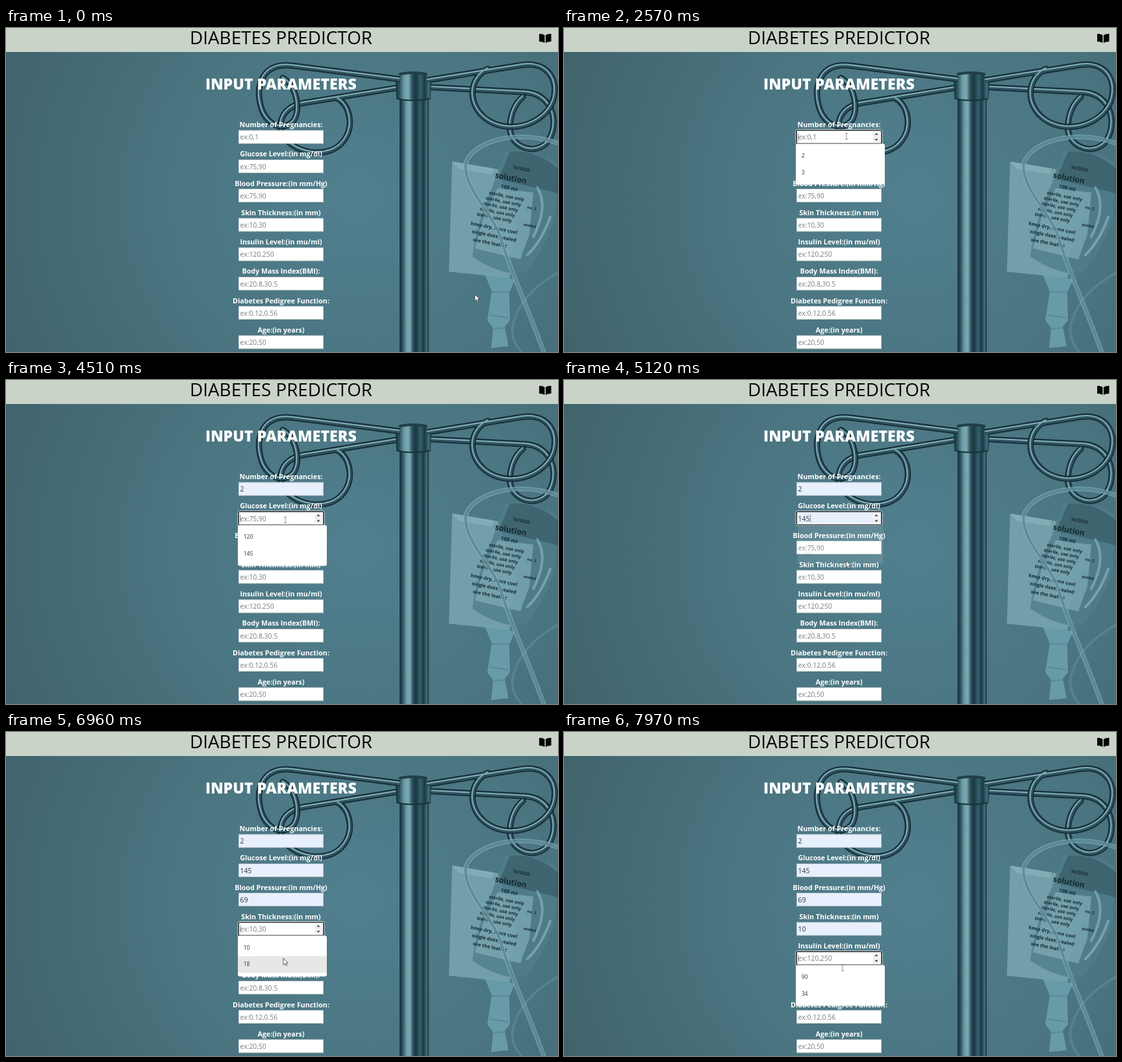
An HTML page with a canvas that plays this animation: 850x500 px, repeating every 8 s.

```html
<!DOCTYPE html>
<html lang="en">
<head>
<meta charset="utf-8">
<title>Diabetes Predictor</title>
<style>
  html, body { margin: 0; width: 850px; height: 500px; overflow: hidden; }
  canvas { display: block; }
</style>
</head>
<body>
<canvas id="stage" width="850" height="500"></canvas>
<script>
const LOOP = 8000, FADE = 130;
const SANS = '"Open Sans", "Noto Sans", sans-serif';
const ctx = document.getElementById('stage').getContext('2d');
const clamp = v => Math.max(0, Math.min(1, v));

// focus: field clicked, pick: suggestion chosen
const fields = [
  { label: 'Number of Pregnancies:', hint: 'ex:0,1', focus: 2460, pick: 3750, options: ['2', '3'], choice: 0 },
  { label: 'Glucose Level:(in mg/dl)', hint: 'ex:75,90', focus: 4250, pick: 5005, options: ['120', '145'], choice: 1 },
  { label: 'Blood Pressure:(in mm/Hg)', hint: 'ex:75,90', focus: 5480, pick: 6110, options: ['76', '69'], choice: 1 },
  { label: 'Skin Thickness:(in mm)', hint: 'ex:10,30', focus: 6510, pick: 7340, options: ['10', '18'], choice: 0 },
  { label: 'Insulin Level:(in mu/ml)', hint: 'ex:120,250', focus: 7780, pick: Infinity, options: ['90', '34'], choice: 0 },
  { label: 'Body Mass Index(BMI):', hint: 'ex:20.8,30.5' },
  { label: 'Diabetes Pedigree Function:', hint: 'ex:0.12,0.56' },
  { label: 'Age:(in years)', hint: 'ex:20,50' }
];
fields.forEach((f, i) => {
  f.y = 157.8 + i * 45.25;
  f.blur = fields[i + 1]?.focus ?? Infinity;
});

// time, x, y
const pointerPath = [
  [0, 722, 411], [19, 722, 411], [20, 707, 399], [520, 707, 399], [760, 547, 329],
  [1010, 547, 329], [1760, 435, 167], [2890, 435, 167], [3240, 431, 199], [3690, 431, 199],
  [3820, 427, 217], [4220, 430, 216], [4600, 430, 216], [5000, 434, 270], [5120, 434.5, 279],
  [5420, 430, 259], [5680, 430, 260], [5790, 429, 283], [6020, 429, 283], [6090, 426, 304],
  [6310, 428, 306], [6640, 428, 306], [6940, 427, 349], [7010, 427, 349], [7240, 428, 332],
  [7380, 428, 332], [7740, 429, 352], [7820, 429, 352], [7950, 429, 364]
];

function pointerAt(t) {
  const next = pointerPath.findIndex(k => k[0] > t);
  if (next < 0) return pointerPath.at(-1).slice(1);
  const [t0, x0, y0] = pointerPath[next - 1], [t1, x1, y1] = pointerPath[next];
  const u = (t - t0) / (t1 - t0), e = u * u * (3 - 2 * u);
  return [x0 + (x1 - x0) * e, y0 + (y1 - y0) * e];
}

function write(c, str, x, y, font, color, align = 'left') {
  c.font = font + ' ' + SANS;
  c.fillStyle = color;
  c.textAlign = align;
  c.fillText(str, x, y);
}

function shape(c, path, fill, stroke, width = 1) {
  const p = new Path2D(path);
  if (fill) { c.fillStyle = fill; c.fill(p); }
  if (stroke) { c.strokeStyle = stroke; c.lineWidth = width; c.stroke(p); }
}

function gradient(c, x0, y0, x1, y1, stops) {
  const g = c.createLinearGradient(x0, y0, x1, y1);
  stops.forEach(([at, color]) => g.addColorStop(at, color));
  return g;
}

function tube(c, path) {
  shape(c, path, null, '#142b34', 9.5);
  shape(c, path, null, '#2f535f', 6);
  c.save();
  c.translate(-.7, -1.2);
  shape(c, path, null, '#83aeb8', 2);
  c.restore();
}

function drawBag(c) {
  const ink = '#152a33';
  shape(c, 'M687 206L758 218L785 300L776 386L682 376Z', 'rgba(127,172,182,.75)');
  shape(c, 'M687 206L752 217L748 226L697 217Z', 'rgba(166,204,211,.3)');
  shape(c, 'M769 190Q805 184 848 208L846 292Q832 336 802 376Q768 386 718 353Q724 303 748 248Z', 'rgba(80,126,139,.8)');
  shape(c, 'M776 191Q815 186 850 217L850 255L758 233Z', 'rgba(35,65,77,.4)');
  shape(c, 'M757 247L812 254L806 318L792 357L722 340L736 290Z', 'rgba(141,187,196,.55)');
  shape(c, 'M818 246Q836 275 812 322M803 350Q824 330 838 292', null, 'rgba(165,205,212,.45)', 4);
  c.save();
  c.translate(776, 216);
  c.rotate(.2);
  write(c, '14/2022', 4, 0, 'bold 7px', ink);
  write(c, 'solution', -20, 19, 'bold 12px', ink);
  write(c, '100 ml', -8, 33, 'bold 8px', ink);
  for (let i = 0; i < 5; i++) {
    write(c, 'sterile, use only', -24 - i * 3, 46 + i * 9, 'bold 7px', ink);
  }
  write(c, 'keep dry, store cool', -42, 98, 'bold 7.5px', ink);
  write(c, 'single dose, sealed', -38, 110, 'bold 7.5px', ink);
  write(c, 'see the leaflet', -34, 122, 'bold 7.5px', ink);
  write(c, 'no. 2', 38, 56, 'bold 6px', ink);
  write(c, 'sealed', 38, 83, 'bold 6px', ink);
  c.restore();
  shape(c, 'M737 379L784 388L775 408L776 451L768 461L774 491L747 494L750 463L741 451L748 407Z', 'rgba(112,164,177,.8)');
  shape(c, 'M748 407L774 408M746 443L772 447M752 464L767 463', null, '#5a8998', 2);
  const hose = 'M850 178C785 155 720 175 708 208C703 249 753 287 764 331C780 383 799 420 828 500';
  shape(c, hose, null, 'rgba(136,181,190,.6)', 7);
  shape(c, hose, null, 'rgba(85,131,143,.75)', 4);
  shape(c, 'M850 378Q796 407 782 452Q774 480 794 500', null, 'rgba(117,165,176,.3)', 4);
}

function makeBackdrop() {
  const canvas = document.createElement('canvas');
  canvas.width = 850;
  canvas.height = 500;
  const c = canvas.getContext('2d');
  const glow = c.createRadialGradient(540, 260, 20, 540, 260, 610);
  [[0, '#517f8e'], [.45, '#4a7581'], [1, '#40626a']].forEach(s => glow.addColorStop(...s));
  c.fillStyle = glow;
  c.fillRect(0, 0, 850, 500);
  c.lineCap = c.lineJoin = 'round';

  tube(c, 'M604 92L456 116C424 123 414 151 431 172C453 196 500 201 520 174C537 151 529 119 511 109');
  tube(c, 'M606 79L440 58C396 53 384 87 392 119C398 147 425 163 443 143C455 124 446 87 426 77');
  tube(c, 'M646 91L800 99C844 102 854 151 832 178C810 198 774 181 776 151C777 130 786 115 796 106');
  tube(c, 'M646 81L795 57C833 51 853 80 842 113C827 151 772 165 739 140C711 119 711 79 742 63');

  const steel = [[0, '#152e38'], [.1, '#29505c'], [.24, '#6d9ba7'], [.36, '#7ba8b3'],
    [.46, '#2d535f'], [.56, '#19363f'], [.7, '#34606d'], [.82, '#1b3a45'], [.93, '#43707d'], [1, '#152e38']];
  c.fillStyle = gradient(c, 606, 0, 651, 0, steel);
  c.fillRect(606, 108, 45, 392);
  c.fillStyle = gradient(c, 600, 0, 655, 0, steel);
  c.fillRect(607, 71, 41, 18);
  shape(c, 'M600 83Q627 89 655 83L654 108Q627 115 601 108Z', c.fillStyle);
  shape(c, 'M607 71Q627 67 647 71', null, '#203f49', 4);
  shape(c, 'M602 109Q627 115 653 109', null, '#17323b', 2);
  drawBag(c);

  c.fillStyle = '#cad3c8';
  c.fillRect(0, 0, 850, 37);
  write(c, 'DIABETES PREDICTOR', 423.5, 25.3, '27.8px', '#050505', 'center');
  shape(c, 'M829.5 11Q826 8.7 821 9V21Q826 20.8 829.5 23ZM831 11Q834.5 8.7 839.5 9V21Q834.5 20.8 831 23Z', '#050505');
  write(c, 'INPUT PARAMETERS', 423.5, 95.3, '800 23.2px', '#fff', 'center');
  fields.forEach(f => write(c, f.label, 423.5, f.y - 4.6, 'bold 10.7px', '#fff', 'center'));
  return canvas;
}

function panelAlpha(f, t) {
  if (!f.options) return 0;
  return clamp((t - f.focus - 20) / 70) * clamp(1 - (t - f.pick) / FADE);
}

function hoveredRow(f, t, y) {
  if (t >= f.pick || panelAlpha(f, t) === 0) return -1;
  const row = Math.floor((y - f.y - 27) / 25.5);
  return row === 0 || row === 1 ? row : -1;
}

function ring(grow, color, width) {
  ctx.beginPath();
  ctx.roundRect(358 - grow, this.y - grow, 131 + grow * 2, 20.6 + grow * 2, 1.5 + grow);
  ctx.strokeStyle = color;
  ctx.lineWidth = width;
  ctx.stroke();
}

function drawField(f, t, px, py) {
  const focused = t >= f.focus && t < f.blur;
  const filled = t >= f.pick || (f.options && hoveredRow(f, t, py) === f.choice);
  const covered = fields.some(o => o !== f && panelAlpha(o, t) > 0 && py > o.y + 21 && py < o.y + 84);
  const hovered = px > 358 && px < 489 && py > f.y && py < f.y + 21 && !covered;
  const value = filled ? f.options[f.choice] : f.hint;

  ctx.fillStyle = filled ? '#e8f0fe' : '#fff';
  ctx.fillRect(358, f.y, 131, 20.6);
  ctx.strokeStyle = '#a9b5b5';
  ctx.lineWidth = .6;
  ctx.strokeRect(358.3, f.y + .3, 130.4, 20);
  if (focused) {
    ring.call(f, 1, '#fff', 1);
    ring.call(f, 0, '#101010', 1.3);
  }
  write(ctx, value, 360.6, f.y + 14.6, '10.4px', filled ? '#303338' : '#777d7b');
  if (focused) {
    ctx.fillStyle = '#555';
    ctx.fillRect(filled ? 361 + ctx.measureText(value).width : 360.5, f.y + 4.5, .7, 12);
  }
  if (focused || hovered) {
    ctx.fillStyle = '#efefef';
    ctx.fillRect(475.5, f.y + 2.3, 11, 16);
    const y = f.y + 10.3;
    shape(ctx, `M478.5 ${y - 3}h5l-2.5 -3zM478.5 ${y + 3}h5l-2.5 3z`, '#454545');
  }
}

function drawPanel(f, t, py) {
  const alpha = panelAlpha(f, t);
  if (!alpha) return;
  const inset = t > f.pick ? (1 - alpha) * 3 : 0;
  const row = hoveredRow(f, t, py);
  ctx.save();
  ctx.globalAlpha = alpha;
  ctx.beginPath();
  ctx.roundRect(357 + inset, f.y + 20.8 + inset, 137 - inset * 2, 63 - inset * 2, 3);
  ctx.fillStyle = '#fff';
  ctx.fill();
  if (row >= 0) {
    ctx.fillStyle = '#e7e7e8';
    ctx.fillRect(357, f.y + 27 + row * 25.5, 137, 25.5);
  }
  f.options.forEach((o, i) => write(ctx, o, 365.7 + inset, f.y + 42.3 + i * 25.5, '8.5px', '#333'));
  ctx.restore();
}

function drawPointer(t, x, y) {
  const overList = fields.some(f => panelAlpha(f, t) > 0 && y > f.y + 27 && y < f.y + 84);
  const overInput = x > 358 && x < 489 && fields.some(f =>
    y > f.y && y < f.y + (panelAlpha(f, t) > 0 ? 27 : 20.6));
  ctx.save();
  ctx.translate(x, y);
  if (overInput && !overList) {
    shape(ctx, 'M-2 -4.5H2M0 -4.5V4.5M-2 4.5H2', null, '#777', .8);
  } else {
    shape(ctx, 'M0 0V10.3L2.4 8.2L4 11.8L5.7 11L4.2 7.5H7.4Z', '#fff', '#30363a', .8);
  }
  ctx.restore();
}

const backdrop = makeBackdrop();
function draw(now) {
  const t = now % LOOP;
  const [x, y] = pointerAt(t);
  ctx.drawImage(backdrop, 0, 0);
  fields.forEach(f => drawField(f, t, x, y));
  fields.forEach(f => drawPanel(f, t, y));
  drawPointer(t, x, y);
}

const start = performance.now();
function tick() {
  draw(performance.now() - start);
  requestAnimationFrame(tick);
}
tick();
</script>
</body>
</html>
```
